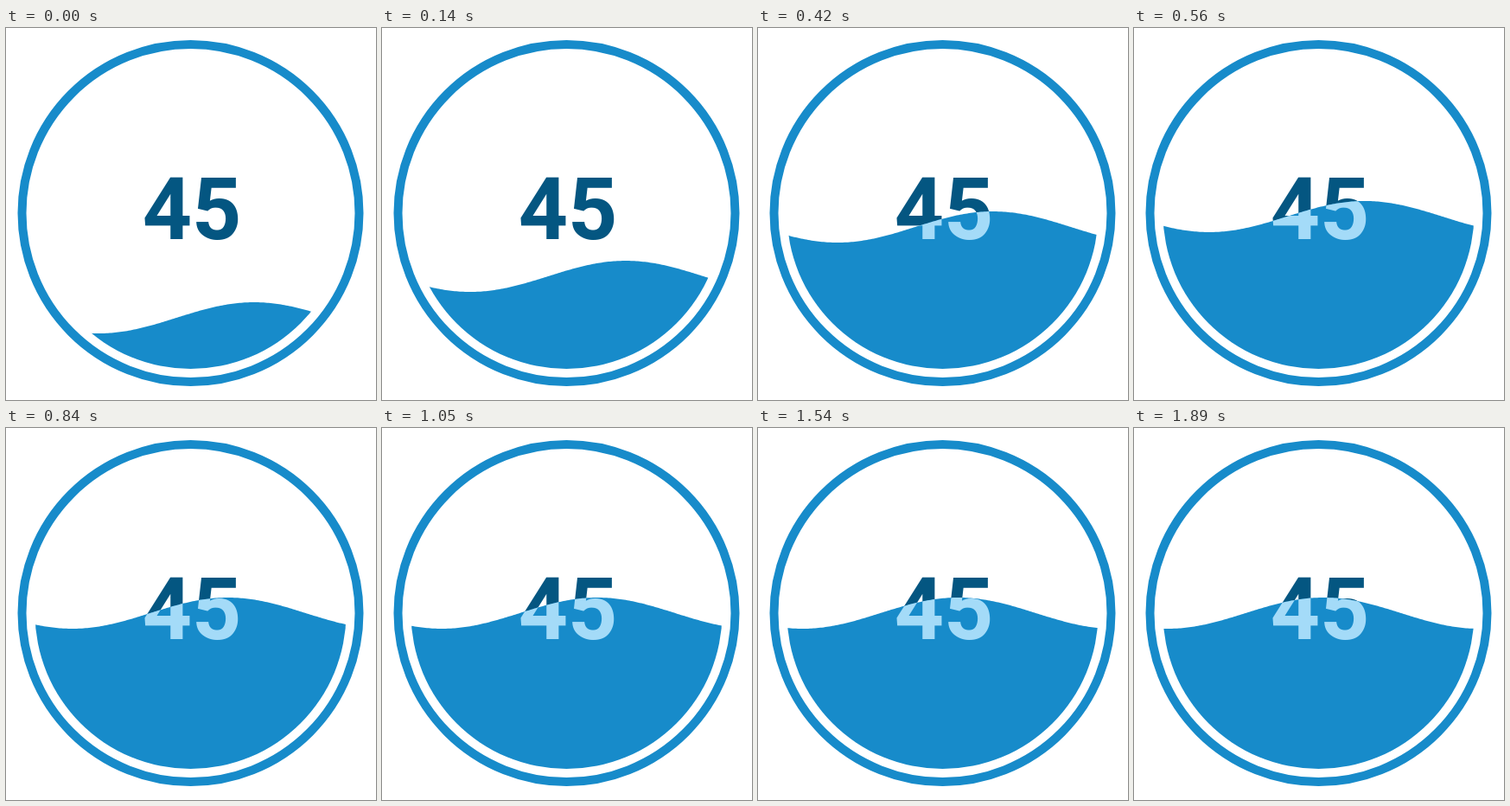
An HTML page with a canvas that plays this animation: 428 by 430 pixels, repeating every 1960 ms.

```html
<!DOCTYPE html>
<html lang="en">
<head>
<meta charset="utf-8">
<title>Liquid gauge</title>
<style>
  html, body { margin: 0; width: 100%; height: 100%; overflow: hidden; background: #fff; }
  canvas { display: block; width: 428px; height: 430px; }
</style>
</head>
<body>
<canvas id="stage" width="428" height="430"></canvas>
<script>
const ctx = document.getElementById('stage').getContext('2d');
const LOOP = 1960, STEP = 70;
const CX = 213.5, CY = 214, FILL_R = 180;
const AMP = 18, WAVELENGTH = 360;
const BLUE = '#178bca', DARK = '#045681', LIGHT = '#a4dbf8';

// Height of the surface at rest: rises quickly, then settles at the middle.
const level = t => CY + Math.pow(Math.max(0, 7.377 - t / 100), 2.4);
// The wave drifts left at a steady speed.
const trough = t => 107 - 0.036 * t;

function label(color) {
  ctx.font = 'bold 100px Roboto, sans-serif';
  ctx.textAlign = 'center';
  ctx.textBaseline = 'alphabetic';
  ctx.fillStyle = color;
  ctx.fillText('45', 215, 244);
}

function disc(r) {
  ctx.beginPath();
  ctx.arc(CX, CY, r, 0, Math.PI * 2);
}

function clipWater(t) {
  const mid = level(t), low = trough(t);
  ctx.beginPath();
  ctx.moveTo(0, 430);
  for (let x = 0; x <= 428; x += 2) {
    ctx.lineTo(x, mid + AMP * Math.cos((x - low) * 2 * Math.PI / WAVELENGTH));
  }
  ctx.lineTo(428, 430);
  ctx.closePath();
  ctx.clip();
}

function draw(t) {
  ctx.fillStyle = '#fff';
  ctx.fillRect(0, 0, 428, 430);

  disc(195);
  ctx.lineWidth = 10;
  ctx.strokeStyle = BLUE;
  ctx.stroke();

  label(DARK);

  ctx.save();
  clipWater(t);
  disc(FILL_R);
  ctx.fillStyle = BLUE;
  ctx.fill();
  label(LIGHT);
  ctx.restore();
}

const start = performance.now();
function tick() {
  const t = (performance.now() - start) % LOOP;
  draw(Math.floor(t / STEP) * STEP);
  requestAnimationFrame(tick);
}
tick();
</script>
</body>
</html>
```
